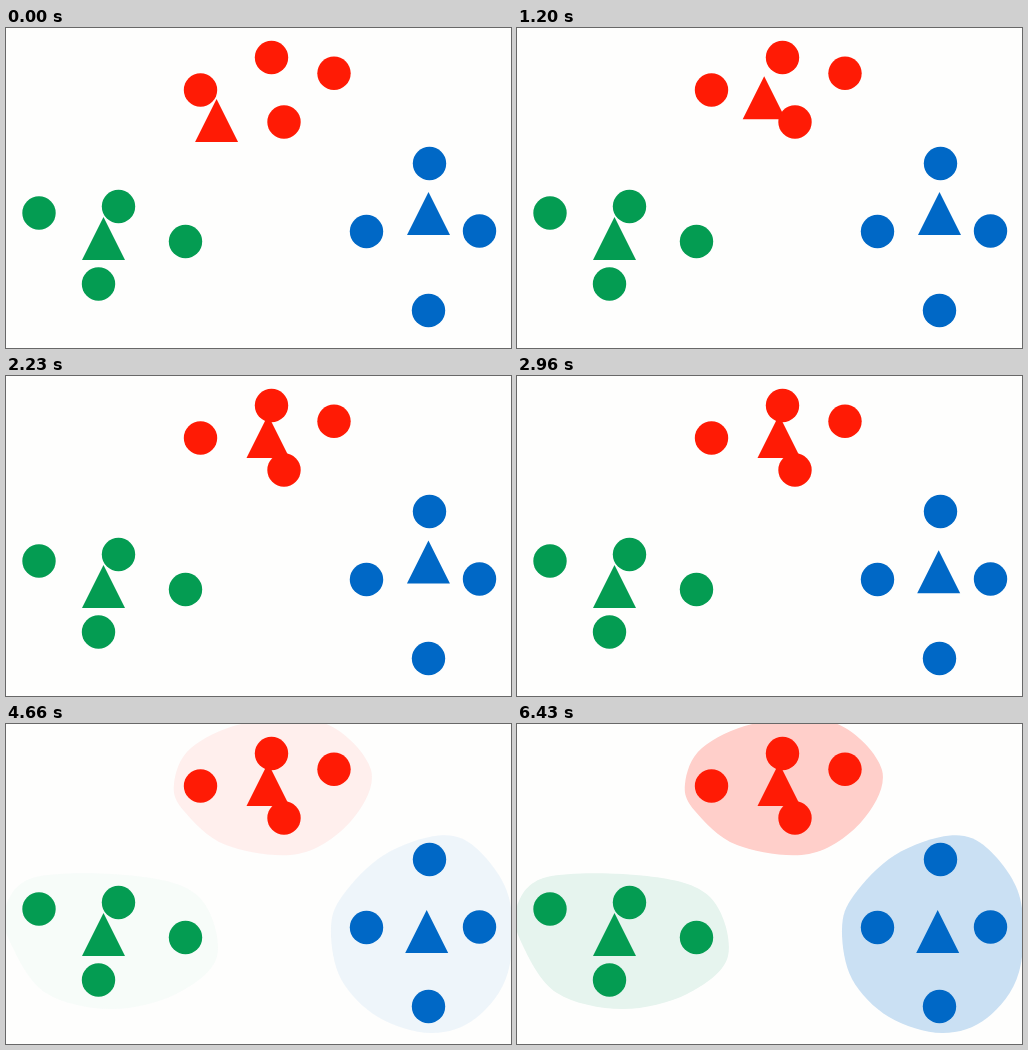
An HTML page that plays this animation: 505 by 320 pixels, repeating every 7000 ms.

```html
<!DOCTYPE html>
<html lang="en">
<head>
<meta charset="utf-8">
<title>Cluster centres</title>
<style>
  html, body { margin: 0; width: 100%; height: 100%; overflow: hidden; background: #fefefd; }
  svg { display: block; width: 505px; height: 320px; }
</style>
</head>
<body>
<svg id="stage" viewBox="0 0 505 320" xmlns="http://www.w3.org/2000/svg"></svg>
<script>
const LOOP = 7000, STEP = 2000, RADIUS = 16.7;

// apex: top of the triangle; shift: how far it moves from `start` on;
// blob: a few key points of the rounded outline
const clusters = [
  {
    color: '#ff1b05', tint: '#ffcfca', apex: [210.5, 71], shift: [51.5, -32], start: -40,
    dots: [[194.5, 62], [265.5, 29.5], [328, 45.3], [278, 94]],
    blob: [[168, 60], [185, 24], [240, -1], [318, -1], [365, 46],
           [345, 97], [292, 130], [220, 121], [178, 87]]
  },
  {
    color: '#049c52', tint: '#e6f4ee', apex: [97.5, 189], shift: [0, 0], start: 0,
    dots: [[33, 185], [112.5, 178.5], [179.5, 213.5], [92.5, 256]],
    blob: [[-1, 185], [30, 153], [130, 152], [193, 173], [211, 232],
           [170, 270], [105, 285], [40, 269], [6, 222]]
  },
  {
    color: '#0068c6', tint: '#cae0f3', apex: [422.5, 164], shift: [-1.8, 22], start: STEP,
    dots: [[423.5, 135.5], [360.5, 203.5], [473.5, 203], [422.5, 282.5]],
    blob: [[325, 205], [337, 171], [378, 131], [433, 111.5], [470, 124], [503, 174],
           [502, 248], [470, 294], [425, 309], [372, 293], [335, 255]]
  }
];

const stage = document.getElementById('stage');

function add(tag, attrs) {
  const el = document.createElementNS(stage.namespaceURI, tag);
  for (const name in attrs) el.setAttribute(name, attrs[name]);
  return stage.appendChild(el);
}

// Closed Catmull-Rom curve through the points
function smoothPath(points) {
  const n = points.length, at = i => points[(i + n) % n];
  const handle = (i, sign) =>
    at(i).map((v, k) => v + sign * (at(i + 1)[k] - at(i - 1)[k]) / 6);
  return 'M' + points[0] + points.map((_, i) =>
    `C${handle(i, 1)} ${handle(i + 1, -1)} ${at(i + 1)}`).join('') + 'Z';
}

const clamp = v => Math.min(1, Math.max(0, v));
const ease = p => p < 0.5 ? 2 * p * p : 1 - 2 * (1 - p) ** 2;

for (const c of clusters) {
  c.area = add('path', { d: smoothPath(c.blob), fill: c.tint });
}
for (const c of clusters) {
  c.marker = add('path', { d: 'M0 0L21.5 43H-21.5Z', fill: c.color });
  for (const [cx, cy] of c.dots) add('circle', { cx, cy, r: RADIUS, fill: c.color });
}

function render(t) {
  const shade = clamp((t - 2 * STEP) / STEP);
  for (const c of clusters) {
    const p = ease(clamp((t - c.start) / STEP));
    const [x, y] = c.apex.map((v, k) => v + c.shift[k] * p);
    c.marker.setAttribute('transform', `translate(${x} ${y})`);
    c.area.setAttribute('opacity', shade);
  }
}

const begin = performance.now();
function tick() {
  render((performance.now() - begin) % LOOP);
  requestAnimationFrame(tick);
}
tick();
</script>
</body>
</html>
```
